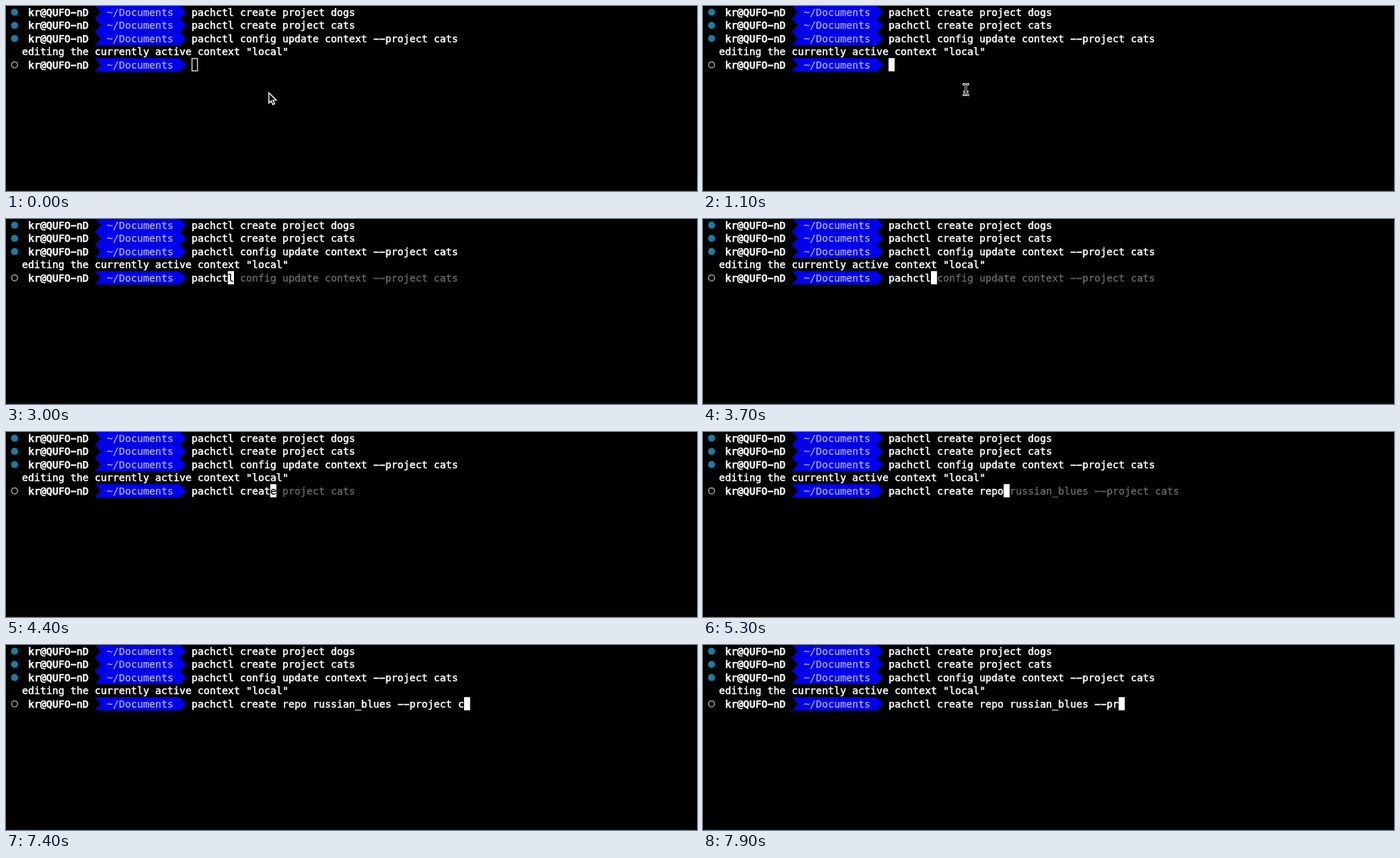
Animation of 970x260 px, one loop 8000 ms. Source, as an HTML page with a canvas:

```html
<!DOCTYPE html>
<html lang="en">
<head>
<meta charset="utf-8">
<title>Terminal session</title>
<style>
html, body { margin: 0; width: 970px; height: 260px; overflow: hidden; background: #010102; }
canvas { display: block; }
</style>
</head>
<body>
<canvas id="stage" width="970" height="260"></canvas>
<script>
const ctx = document.getElementById('stage').getContext('2d');
const LOOP = 8000, CELL = 8.5, LINE = 18.5, LEFT = 22.5, PROMPT = 28;
const HOST = 'kr@QUFO-nD';
const COMMAND = 'pachctl create repo russian_blues --project cats';
const HISTORY = [
  'pachctl config update context --project cats',
  'pachctl create project cats',
  COMMAND
];
// Moment at which each character is typed
const KEYS = [1500, 1700, 2000, 2300, 2600, 2900, 3200, 3800, 3900, 4000, 4100,
  4200, 4300, 4500, 4700, 4900, 5000, 5100, 5200, 5400, 5600, 5700];
const FOCUS = 800, ACCEPT = 5900, BLINK_OFF = 6500, BLINK_ON = 7100;

const colX = col => LEFT + col * CELL;
const rowY = row => row * LINE - 0.75;

function text(str, col, row, color = '#fff', weight = 0.5) {
  ctx.fillStyle = ctx.strokeStyle = color;
  ctx.lineWidth = weight;
  ctx.lineJoin = 'round';
  [...str].forEach((ch, i) => {
    const glyph = ch === '-' ? '\u2212' : ch; // wide terminal hyphen
    const x = colX(col + i), y = rowY(row) + 14.4;
    ctx.fillText(glyph, x, y);
    ctx.strokeText(glyph, x, y);
  });
  ctx.lineJoin = 'miter';
}

function polygon(points) {
  ctx.beginPath();
  points.forEach(([x, y]) => ctx.lineTo(x, y));
  ctx.closePath();
}

function prompt(row, done) {
  const top = rowY(row), mid = top + LINE / 2, bottom = top + LINE;
  ctx.beginPath();
  ctx.arc(12, mid + 0.2, done ? 4.9 : 4.2, 0, 7);
  if (done) {
    ctx.fillStyle = '#1b7da3';
    ctx.fill();
  } else {
    ctx.strokeStyle = '#858585';
    ctx.lineWidth = 1.9;
    ctx.stroke();
  }
  text(HOST, 1, row, '#fff', 0.75);
  polygon([[colX(12), top], [colX(26), top], [colX(27), mid], [colX(26), bottom],
    [colX(12), bottom], [colX(13), mid]]);
  ctx.fillStyle = '#0000ee';
  ctx.fill();
  text('~/Documents', 14, row, '#b4b4f0', 0.25);
}

function typedAt(t) {
  if (t < ACCEPT) return COMMAND.slice(0, KEYS.filter(k => k <= t).length);
  const erased = Math.max(0, Math.floor((t - 7100) / 80));
  return COMMAND.slice(0, COMMAND.length - erased);
}

function inputLine(t) {
  const typed = typedAt(t);
  const match = typed && t < ACCEPT ? HISTORY.find(h => h.startsWith(typed)) : '';
  const ghost = match.slice(typed.length);
  const col = PROMPT + typed.length;
  text(typed, PROMPT, 4);
  text(ghost, col, 4, '#686868', 0.35);
  if (t < FOCUS) {
    ctx.strokeStyle = '#fff';
    ctx.lineWidth = 1.2;
    ctx.strokeRect(colX(col) + 0.6, rowY(4) + 0.6, CELL - 0.8, LINE - 1.2);
  } else if (t < BLINK_OFF || t >= BLINK_ON) {
    ctx.fillStyle = '#fff';
    ctx.fillRect(colX(col), rowY(4), CELL, LINE);
    if (ghost) text(ghost[0], col, 4, '#000', 0.25);
  }
}

function arrow(x, y) {
  polygon([[0, 0], [0, 14.4], [3.3, 11.4], [5.5, 16.6], [8, 15.5], [5.8, 10.4], [10.3, 10.2]]
    .map(([dx, dy]) => [x + dx, y + dy]));
  ctx.fillStyle = '#000';
  ctx.fill();
  ctx.strokeStyle = '#fff';
  ctx.lineWidth = 1.4;
  ctx.stroke();
}

function beam(x, y) {
  ctx.beginPath();
  for (const side of [-1, 1]) {
    ctx.moveTo(x + side * 3, y - 7.5);
    ctx.quadraticCurveTo(x, y - 7.5, x, y - 5);
    ctx.lineTo(x, y + 5);
    ctx.quadraticCurveTo(x, y + 7.5, x + side * 3, y + 7.5);
  }
  ctx.moveTo(x - 2, y + 3);
  ctx.lineTo(x + 2, y + 3);
  ctx.lineCap = 'square';
  for (const [color, width] of [['#fff', 3], ['#000', 1]]) {
    ctx.strokeStyle = color;
    ctx.lineWidth = width;
    ctx.stroke();
  }
  ctx.lineCap = 'butt';
}

function pointer(t) {
  if (t < 700) arrow(369, 122 - 6 * Math.min(1, t / 500));
  else if (t < KEYS[0]) beam(369, 117.5);
}

function draw() {
  const t = performance.now() % LOOP;
  ctx.fillStyle = '#010102';
  ctx.fillRect(0, 0, 970, 260);
  ctx.fillStyle = '#0b0b0b';
  ctx.fillRect(0, 258, 970, 2);
  ctx.font = '14.12px "DejaVu Sans Mono", monospace';
  ['pachctl create project dogs', HISTORY[1], HISTORY[0]].forEach((cmd, row) => {
    prompt(row, true);
    text(cmd, PROMPT, row);
  });
  text('editing the currently active context "local"', 0, 3);
  prompt(4, false);
  inputLine(t);
  pointer(t);
  requestAnimationFrame(draw);
}
draw();
</script>
</body>
</html>
```
